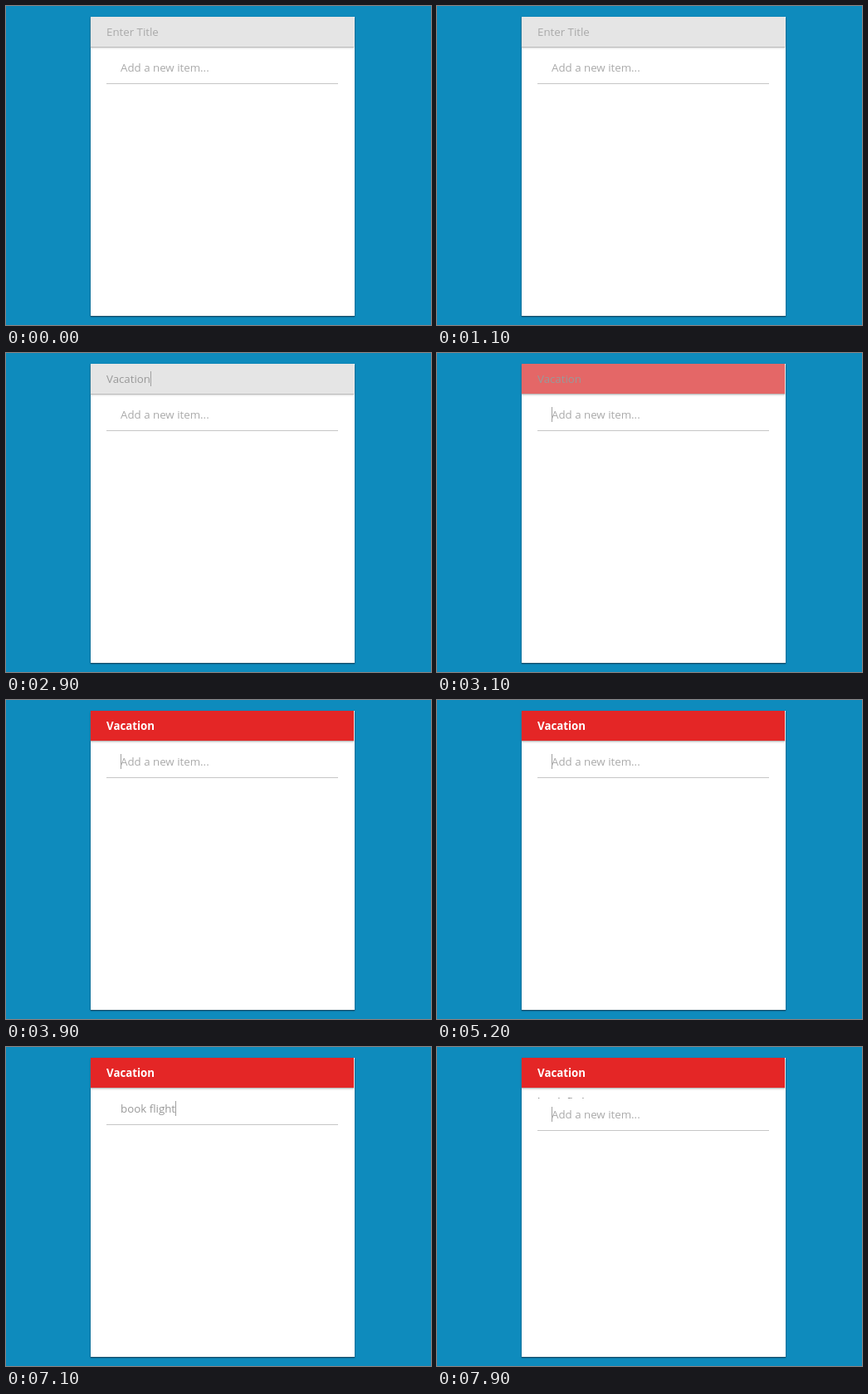
An HTML page for the animation above (8000 ms loop, 512x384 px).

```html
<!DOCTYPE html>
<html lang="en">
<head>
<meta charset="utf-8">
<title>List card</title>
<style>
  html, body { margin: 0; width: 100%; height: 100%; overflow: hidden; background: #0e8bbd; }
  body { position: relative; font: 13.3px/18px "Open Sans", sans-serif; color: #999; }
  div { position: absolute; white-space: pre; }
  #card {
    left: 102px; top: 13px; width: 318px; height: 360px; background: #fff;
    box-shadow: 0 1px 1px #174f6c, 0 1px 2px rgba(0, 30, 50, .45);
  }
  #header {
    left: 0; top: 0; width: 317px; height: 36px; background: #e5e5e5;
    box-shadow: 0 1px 1px #bdbdbd, 0 2px 2px rgba(0, 0, 0, .12);
  }
  #title { left: 19px; top: 9px; }
  #row { left: 19px; top: 52px; width: 279px; height: 28px; border-bottom: 1.5px solid #c6c6c6; }
  #entry { left: 17px; top: 0; }
  #item { left: 19px; top: 44px; width: 279px; height: 0; overflow: hidden; color: #777; }
  .placeholder { color: #aaa; }
  .caret {
    display: inline-block; width: 1px; height: 18px; margin-right: -1px;
    vertical-align: top; background: #a0a0a0;
  }
</style>
</head>
<body>
<div id="card">
  <div id="header"><div id="title"></div></div>
  <div id="item">book flights</div>
  <div id="row"><div id="entry"></div></div>
</div>
<script>
const LOOP = 8000, TICK = 100, BLINK = 500;
const FOCUS_TITLE = 600, FOCUS_ENTRY = 2950, SUBMIT = 7800;
const titleKeys = [1600, 1700, 1800, 2000, 2200, 2400, 2500, 2700];
const entryKeys = [5300, 5600, 5700, 5800, 6000, 6400, 6600, 6700, 6900, 7000, 7100, 7300];

const [header, title, row, entry, item] =
  ["header", "title", "row", "entry", "item"].map(id => document.getElementById(id));
const clamp = x => Math.min(1, Math.max(0, x));
const mix = (from, to, p) =>
  `rgb(${from.map((v, i) => Math.round(v + (to[i] - v) * p)).join()})`;

// The caret restarts its blink on focus and after every key press.
function caretOn(t, focus, keys) {
  const last = Math.max(focus, ...keys.filter(k => k <= t));
  return t >= focus && Math.floor((t - last + 50) / BLINK) % 2 === 0;
}

function field(el, value, placeholder, caret) {
  const mark = caret ? '<span class="caret"></span>' : "";
  el.className = value ? "" : "placeholder";
  el.innerHTML = value ? value + mark : mark + placeholder;
}

function render(t) {
  const inEntry = t >= FOCUS_ENTRY;
  const typed = (text, keys) => text.slice(0, keys.filter(k => k <= t).length);

  field(title, typed("Vacation", titleKeys), "Enter Title",
    !inEntry && caretOn(t, FOCUS_TITLE, titleKeys));
  const p = clamp((t - 2900) / 480);
  header.style.background = mix([229, 229, 229], [228, 38, 38], 1 - (1 - p) ** 2);
  title.style.color = inEntry ? mix([153, 153, 153], [255, 255, 255], clamp((t - 3100) / 300)) : "";
  title.style.fontWeight = t >= 3200 ? 700 : 400;

  const submitted = t >= SUBMIT;
  field(entry, submitted ? "" : typed("book flights", entryKeys), "Add a new item...",
    caretOn(t, FOCUS_ENTRY, [...entryKeys, SUBMIT]));
  const drop = Math.round(7 * clamp((t - 7700) / 200) ** 2);
  const shift = submitted ? drop : 0;
  row.style.top = 52 + shift + "px";
  item.style.height = Math.max(0, shift - 2) + "px";
}

let shown = -1;
const start = performance.now();
function frame() {
  const t = Math.floor((performance.now() - start) % LOOP / TICK) * TICK;
  if (t !== shown) render(shown = t);
  requestAnimationFrame(frame);
}
frame();
</script>
</body>
</html>
```
